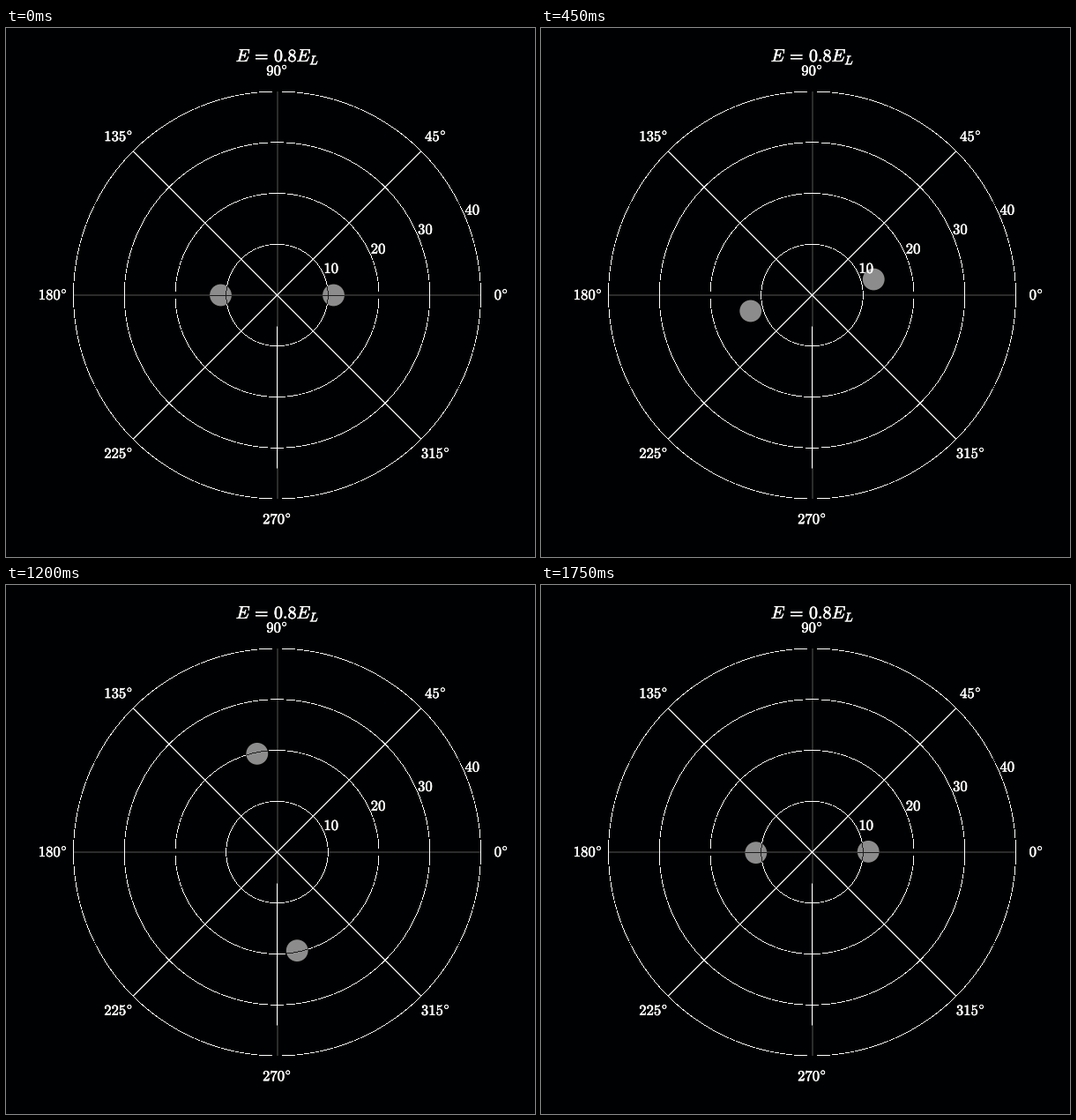
These frames come from a looping animation (600 by 600 pixels, 1800 ms). A matplotlib script:

```python
import numpy as np
import matplotlib.pyplot as plt
from matplotlib import patheffects
from matplotlib.animation import FuncAnimation
from matplotlib.patches import Circle
from matplotlib.path import Path

plt.rcParams["mathtext.fontset"] = "cm"

SIZE, DPI = 600, 100
FRAMES, STEP = 36, 50
CX, CY, R = 307.5, 303.0, 231.0
RINGS = [k * R / 4 for k in range(1, 5)]
ECC = np.sqrt(1 - 0.8)      # eccentricity for E = 0.8 E_L
SEMI_LATUS = 64.0
PERIOD = 34.96              # orbital period in frames
DOT_R = 12.4
LABEL_R = 254.3
DIM, SHADE = "#2b2b2b", "#1e1e1e"

fig = plt.figure(figsize=(SIZE / DPI, SIZE / DPI), dpi=DPI,
                 facecolor="#000102")
ax = fig.add_axes([0, 0, 1, 1])
ax.set_xlim(0, SIZE)
ax.set_ylim(SIZE, 0)
ax.axis("off")


def px(width):
    """Pixels to points."""
    return width * 72 / DPI


def polar(r, deg):
    a = np.radians(deg)
    return CX + r * np.cos(a), CY - r * np.sin(a)


def rings(width, level, z):
    """Crisp hairline circles that break where they step between pixels."""
    y, x = np.mgrid[:SIZE, :SIZE] + 0.5
    dist = np.hypot(x - CX, y - CY)
    rgba = np.full((SIZE, SIZE, 4), level, dtype=float)
    rgba[..., 3] = sum(np.abs(dist - r) < width / 2 for r in RINGS)
    return ax.imshow(rgba, extent=(0, SIZE, SIZE, 0), aspect="auto",
                     interpolation="nearest", zorder=z)


def line(p, q, width, color, z):
    return ax.plot([p[0], q[0]], [p[1], q[1]], color=color, lw=px(width),
                   solid_capstyle="butt", zorder=z)[0]


def label(x, y, text, size=12, ha="center"):
    bold = patheffects.withStroke(linewidth=px(0.5), foreground="white")
    ax.text(x, y, f"${text}$", color="white", size=size, ha=ha,
            va="baseline", zorder=6, path_effects=[bold])


def grid():
    rings(0.86, 1, 2)
    for deg in (45, 135):
        line(polar(R, deg), polar(R, deg + 180), 1.25, "white", 2)
    line((CX - R, CY), (CX + R, CY), 2, DIM, 1)
    line((CX + 0.5, CY - R), (CX + 0.5, CY + R), 2, DIM, 1)
    line((CX - 0.5, 337.5), (CX - 0.5, 499), 1, "white", 2)
    for k, r in enumerate(RINGS, 1):
        x, y = polar(r, 22.5)
        label(x - 0.5, y - 3, str(10 * k), ha="left")
    for deg in range(0, 360, 45):
        x, y = polar(LABEL_R, deg)
        label(x, y + 5, rf"{deg}^{{\circ}}")
    label(308, 38, r"E\,=\,0.8E_L", 14.4)


def shaded_grid():
    """Dark grid lines that show only across the dots."""
    spokes = [line(polar(R, d), polar(R, d + 180), 1, SHADE, 4)
              for d in (0, 45, 90, 135)]
    return [rings(1, 0.12, 4)] + spokes


def orbit(n):
    """Radius and angle of the ellipse, starting a quarter before perihelion."""
    e0 = np.arccos(ECC)
    m = 2 * np.pi * n / PERIOD - (e0 - ECC * np.sin(e0))
    e = m
    for _ in range(12):
        e -= (e - ECC * np.sin(e) - m) / (1 - ECC * np.cos(e))
    nu = 2 * np.arctan2(np.sqrt(1 + ECC) * np.sin(e / 2),
                        np.sqrt(1 - ECC) * np.cos(e / 2))
    return SEMI_LATUS / (1 + ECC * np.cos(nu)), np.degrees(nu) + 90


grid()
dots = [ax.add_patch(Circle((CX, CY), DOT_R, fc="#8c8c8c", ec="none",
                            zorder=3)) for _ in range(2)]
shades = shaded_grid()


def update(n):
    r, deg = orbit(n)
    centers = [polar(r, deg), polar(r, deg + 180)]
    for dot, c in zip(dots, centers):
        dot.center = c
    clip = Path.make_compound_path(*(Path.circle(c, DOT_R) for c in centers))
    for s in shades:
        s.set_clip_path(clip, ax.transData)
    return dots + shades


anim = FuncAnimation(fig, update, frames=FRAMES, interval=STEP,
                     repeat=True, repeat_delay=0, blit=False)
plt.show()
```
